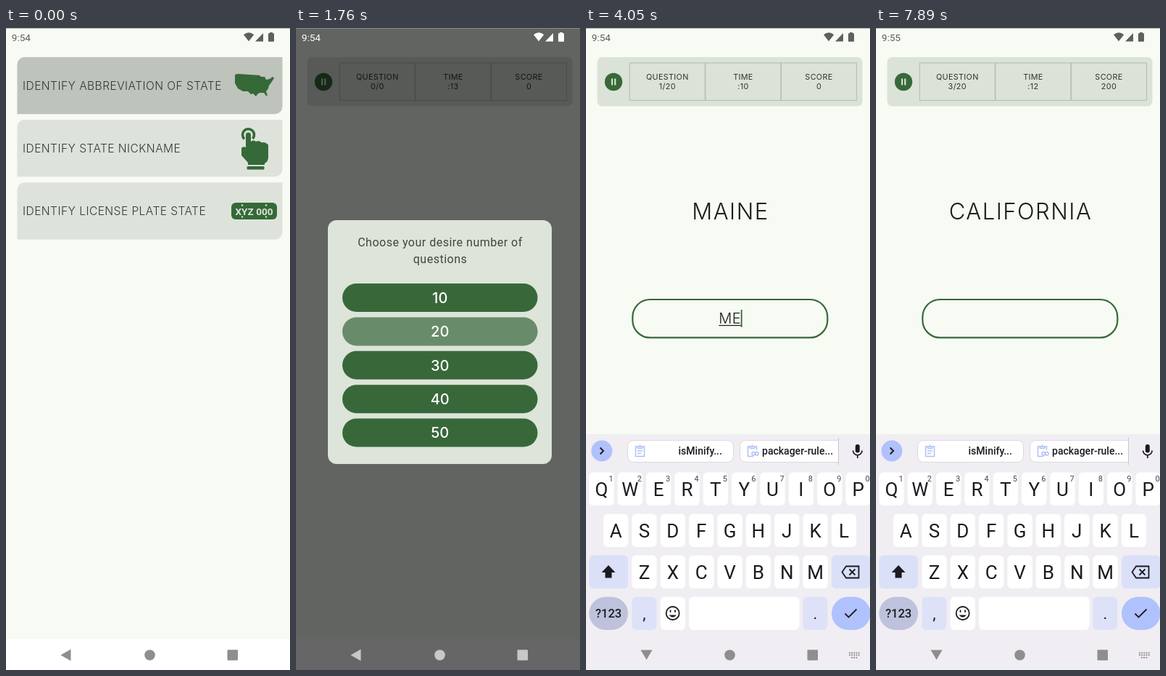
Animation of 392 by 882 pixels, one loop 8 s. Source, as an HTML page:

```html
<!DOCTYPE html>
<html lang="en">
<head>
<meta charset="utf-8">
<title>State quiz</title>
<style>
html, body { margin: 0; width: 100%; height: 100%; overflow: hidden; background: #f7fbf3; }
svg { display: block; width: 100vw; height: 100vh; }
text { font-family: Inter, "Open Sans", sans-serif; }
.ui { font-family: Roboto, "Noto Sans", sans-serif; }
.thin { font-weight: 300; }
.mid { text-anchor: middle; }
</style>
</head>
<body>
<svg viewBox="0 0 392 882">
  <rect width="392" height="882" fill="#f7fbf3"/>

  <g id="home">
    <g id="cards"></g>
    <g fill="#356937">
      <path d="M316 64L320 63 350 65 352 67 357 67 359 71 364 70 368 67 370 69 368 72 366 75 363 79 362 83 359 87 361 93 359 93 356 89 350 89 347 91 345 94 341 90 338 91 334 87 327 87 320 83 316 76Z"/>
      <path d="M331 147a3.5 3.5 0 0 1 7 0V156q4-3 7 0q4-2 8 1.5q4-2 9 3V178q0 5-5 8V188H334V185L325 175V165q2-3 6-1z"/>
      <path d="M329 152.500A8 8 0 1 1 340.500 152" fill="none" stroke="#356937" stroke-width="3.600"/>
      <rect x="332.500" y="190" width="24" height="4.500" rx="1.500"/>
      <rect x="311" y="240" width="63" height="23" rx="6"/>
    </g>
    <text class="ui mid" x="342.500" y="256.500" font-size="13.600" font-weight="700" fill="#dde3da">XYZ 000</text>
    <path d="M326 243.500h.1M359 243.500h.1M326 259.500h.1M359 259.500h.1" stroke="#dde3da" stroke-width="2.400" stroke-linecap="round"/>
  </g>

  <g id="quiz">
    <rect x="15.500" y="40" width="366" height="67.500" rx="7" fill="#dbe2d8"/>
    <circle cx="38" cy="74" r="12.200" fill="#38683a"/>
    <path d="M36 69.500v9M40.200 69.500v9" stroke="#cfe5cb" stroke-width="2.200"/>
    <g id="cells"></g>
    <g id="ask">
      <text id="state" class="thin mid" x="199.500" fill="#1a1d19" letter-spacing="1.500"></text>
      <rect id="box" x="64.300" y="373" width="269" height="52.400" rx="24" fill="none"/>
      <text id="answer" class="thin mid" x="198.700" y="406.300" font-size="20" letter-spacing=".4" fill="#1a1d19"></text>
      <rect id="under" y="408" height="1.200" fill="#1a1d19"/>
      <rect id="caret" y="387" width="1.800" height="24" fill="#38683a"/>
    </g>
  </g>

  <rect y="839.500" width="392" height="43" fill="#fff"/>

  <g id="board">
    <rect y="558" width="392" height="330" fill="#f0eef2"/>
    <circle cx="21.800" cy="581" r="14.500" fill="#b0c1fc"/>
    <path d="M19.500 576.500l4.500 4.500-4.500 4.500" fill="none" stroke="#1b1b20" stroke-width="1.900"/>
    <rect x="57.500" y="566.500" width="146" height="30" rx="8" fill="#fff" stroke="#d9d9e2"/>
    <path d="M349 566.500H220.500a8 8 0 0 0-8 8v14a8 8 0 0 0 8 8H349" fill="#fff" stroke="#d9d9e2"/>
    <path d="M348.500 563v37" stroke="#c6c6ce"/>
    <g fill="none" stroke="#b0bff5" stroke-width="1.500">
      <path d="M68.500 575h12v13.500h-12zM71.500 575v2.500h6V575M74.500 572.500v2M71 581h7M71 584.500h5"/>
      <path d="M231 588.500h-7.500V575h12v5M226.500 575v2.500h6V575M229.500 572.500v2"/>
      <rect x="229" y="582.500" width="4.500" height="4.500" rx="2.200"/>
      <rect x="233.500" y="582.500" width="4.500" height="4.500" rx="2.200"/>
    </g>
    <g font-weight="500" font-size="14" fill="#1b1b20">
      <text class="ui" x="127.500" y="586">isMinify...</text>
      <text class="ui" x="243" y="586">packager-rule...</text>
    </g>
    <rect x="371.800" y="572" width="6" height="11.500" rx="3" fill="#1b1b20"/>
    <path d="M368.500 580.500a6.300 6.300 0 0 0 12.600 0M374.800 587v4" fill="none" stroke="#1b1b20" stroke-width="1.700"/>
    <g id="keys"></g>
    <g fill="none" stroke="#1b1b20" stroke-width="1.800">
      <path d="M31 738l9.500 10H35.500v7.500h-9V748H21.500z" fill="#1b1b20" stroke="none"/>
      <path d="M353.500 747.500l5.500-8h17.500v16H359zM363.500 743.500l8 8M371.500 743.500l-8 8"/>
      <circle cx="119.700" cy="804" r="9"/>
      <path d="M114.500 806.500q5.200 6 10.400 0z" fill="#1b1b20" stroke="none"/>
      <path d="M116.500 799.500v3.200M123 799.500v3.200M357.500 804.500l5 5 11-11"/>
    </g>
  </g>

  <g id="dialog">
    <rect width="392" height="882" fill="#000" opacity=".6"/>
    <rect x="44" y="264" width="309" height="335" rx="12" fill="#dde4d9"/>
    <g font-size="16" letter-spacing=".5" fill="#41463f">
      <text class="ui mid" x="199" y="300">Choose your desire number of</text>
      <text class="ui mid" x="199" y="323">questions</text>
    </g>
    <clipPath id="pill"><rect x="64" y="397.400" width="269.500" height="39" rx="19.500"/></clipPath>
    <g id="options"></g>
  </g>

  <g id="status">
    <text id="clock" class="ui" x="7.800" y="18" font-size="13.600"></text>
    <path d="M328 9.200q7.200-5.800 14.200 0L335 18.200zM344 18.500L355 7v11.500zM364 7.200V6h4v1.200h1.200q.8 0 .8.800v10q0 .8-.8.800h-6.400q-.8 0-.8-.8v-10q0-.8.800-.8z"/>
  </g>
  <g id="nav">
    <path id="back"/>
    <circle cx="198.500" cy="861.500" r="7.300"/>
    <rect x="305.500" y="854.300" width="14.500" height="14.500" rx="1"/>
    <path id="ime" d="M363 858.500h15M363 861.500h15M366 865h9" stroke="#8e8e90" stroke-width="1.800" stroke-dasharray="1.800 1.400"/>
  </g>
  <path d="M0 .4H392" stroke="#9a9c98" stroke-width=".8"/>
</svg>

<script>
const $ = id => document.getElementById(id);
const LOOP = 8000;

function add(parent, tag, attrs, text) {
  const el = document.createElementNS("http://www.w3.org/2000/svg", tag);
  set(el, attrs);
  if (text !== undefined) el.textContent = text;
  parent.append(el);
  return el;
}
function set(el, attrs) {
  for (const k in attrs) el.setAttribute(k, attrs[k]);
}
const show = (el, on) => { el.style.display = on ? "" : "none"; };
const ramp = (t, a, b) => Math.min(1, Math.max(0, (t - a) / (b - a)));
const easeOut = u => 1 - (1 - u) ** 3;
const grey = v => `rgb(${v},${v},${v})`;

// Menu cards
let pressed;
["ABBREVIATION OF STATE", "STATE NICKNAME", "LICENSE PLATE STATE"].forEach((label, i) => {
  const y = 40 + i * 86.1, g = $("cards");
  const d = `M25.500 ${y}H381.500v68.200a10 10 0 0 1-10 10H15.500V${y + 10}a10 10 0 0 1 10-10z`;
  add(g, "path", { d, fill: "#dde3da" });
  if (!i) pressed = add(g, "path", { d, fill: "#000" });
  add(g, "text", {
    x: 23, y: y + 45, class: "thin", "font-size": 15.6, "letter-spacing": .42, fill: "#343932"
  }, "IDENTIFY " + label);
});

// Score header
const cells = ["QUESTION", "TIME", "SCORE"].map((label, i) => {
  const x = 60.300 + i * 104.6, g = $("cells");
  const style = { x: x + 52, class: "mid", "font-size": 10.8, "letter-spacing": .35, fill: "#2f342e" };
  add(g, "rect", { x, y: 48, width: 104, height: 51.5, fill: "none", stroke: "#b9c0b5", "stroke-width": 1.2 });
  add(g, "text", { ...style, y: 71 }, label);
  return add(g, "text", { ...style, y: 84 });
});

// Dialog options
let ripple;
for (let i = 0; i < 5; i++) {
  const y = 351 + i * 46.4, g = $("options");
  add(g, "rect", { x: 64, y, width: 269.5, height: 39, rx: 19.5, fill: "#38683a" });
  if (i === 1) {
    const wrap = add(g, "g", { "clip-path": "url(#pill)" });
    ripple = add(wrap, "circle", { cx: 199, cy: y + 19.5, fill: "#fff" });
  }
  add(g, "text", { x: 198.7, y: y + 26.8, class: "mid", "font-size": 20, "font-weight": 500, fill: "#fff" }, (i + 1) * 10);
}

// Keyboard
const keys = {};
function key(name, x, y, w, fill, label = "", size = 26, rx = 6) {
  keys[name] = add($("keys"), "rect", { x, y, width: w, height: 45.5, rx, fill });
  add($("keys"), "text", {
    x: x + w / 2, y: y + 23 + size * .36, class: "ui mid", "font-size": size,
    "font-weight": size < 20 ? 500 : 400, fill: "#1b1b20"
  }, label);
}
[["QWERTYUIOP", 4.3, 610.5], ["ASDFGHJKL", 24, 667.5], ["ZXCVBNM", 63.4, 724.5]].forEach(([row, x0, y], r) => {
  [...row].forEach((c, i) => {
    const x = x0 + i * 39.35;
    key(c, x, y, 34.3, "#fff", c);
    if (!r) add($("keys"), "text", { x: x + 30.2, y: y + 12, class: "ui mid", "font-size": 11, fill: "#44464f" }, (i + 1) % 10);
  });
});
key("shift", 4.3, 724.5, 53.7, "#dbe0f9");
key("del", 339, 724.5, 53.5, "#dbe0f9");
key("sym", 4.3, 781.5, 53.7, "#bfc2dc", "?123", 16.5, 22.7);
key(",", 63.4, 781.5, 34, "#dde2f9", ",", 22);
key("emoji", 102.7, 781.5, 34.3, "#fff");
key("space", 142, 781.5, 152.5, "#fff");
key(".", 299.3, 781.5, 34, "#dde2f9", ".", 22);
key("enter", 339, 781.5, 53.5, "#b0c2fd", "", 16, 22.7);

const taps = [["M", 2950], ["E", 3700], ["enter", 5150], ["V", 6400], ["A", 6900], ["enter", 7250]];
const rounds = [
  { at: 1880, no: 1, name: "MAINE", size: 31, from: 13, tick: 2000, typed: [["M", 3000], ["E", 3750]] },
  { at: 5250, no: 2, name: "VIRGINIA", size: 27.6, from: 12, tick: 6250, typed: [["V", 6450], ["A", 6950]] },
  { at: 7350, no: 3, name: "CALIFORNIA", size: 31, from: 12, tick: 8350, typed: [] }
];

function drawRound(t) {
  const q = rounds.findLast(r => t >= r.at);
  show($("ask"), q);
  if (!q) {
    ["0/0", ":13", "0"].forEach((s, i) => cells[i].textContent = s);
    return;
  }
  const ticks = t < q.tick ? 0 : 1 + Math.floor((t - q.tick) / 1000);
  const left = String(q.from - ticks).padStart(2, "0");
  [q.no + "/20", ":" + left, (q.no - 1) * 100].forEach((s, i) => cells[i].textContent = s);

  $("state").textContent = q.name;
  set($("state"), { "font-size": q.size, y: 252 + q.size * .36 });
  const focus = t >= 2000;
  set($("box"), { stroke: focus ? "#38683a" : "#6f776b", "stroke-width": focus ? 2.2 : 1.1 });

  const done = q.typed.filter(k => t >= k[1]);
  $("answer").textContent = done.map(k => k[0]).join("");
  const w = done.length ? $("answer").getComputedTextLength() : 0;
  set($("under"), { x: 198.7 - w / 2, width: w });
  set($("caret"), { x: 198.4 + w / 2 });
  const since = done.length ? done[done.length - 1][1] : q.at;
  show($("caret"), (t - since) % 1000 < 500);
}

function draw(t) {
  const inQuiz = t >= 1750;
  show($("home"), !inQuiz);
  show($("quiz"), inQuiz);
  pressed.setAttribute("opacity", .14 * (1 - ramp(t, 350, 650)));

  const veil = ramp(t, 45, 150) * (1 - ramp(t, 1800, 1900));
  show($("dialog"), veil > 0);
  $("dialog").setAttribute("opacity", veil);
  set(ripple, { r: 20 + 125 * easeOut(ramp(t, 1550, 1760)), opacity: .24 * ramp(t, 1550, 1620) });

  if (inQuiz) drawRound(t);

  const rise = easeOut(ramp(t, 2080, 2360));
  show($("board"), rise > 0);
  $("board").setAttribute("transform", `translate(0 ${324 * (1 - rise)})`);
  for (const [name] of taps) keys[name].style.fill = "";
  for (const [name, at] of taps) {
    if (t >= at && t < at + 130) keys[name].style.fill = name === "enter" ? "#94a7e6" : "#d5d6e0";
  }

  const light = t < 1000 ? ramp(t, 45, 150) : 1 - ramp(t, 1850, 2000);
  $("status").setAttribute("fill", grey(Math.round(95 + 160 * light)));
  $("nav").setAttribute("fill", grey(Math.round(142 + 58 * Math.min(1, light * 1.6))));
  $("clock").textContent = t < 4700 ? "9:54" : "9:55";
  const open = t >= 2080;
  $("back").setAttribute("d", open ? "M75.500 854.500H91.500L83.500 868z" : "M75.500 861.500L89.500 853.500V869.500z");
  show($("ime"), open);
}

const start = performance.now();
function loop() {
  draw((performance.now() - start) % LOOP);
  requestAnimationFrame(loop);
}
loop();
</script>
</body>
</html>
```
